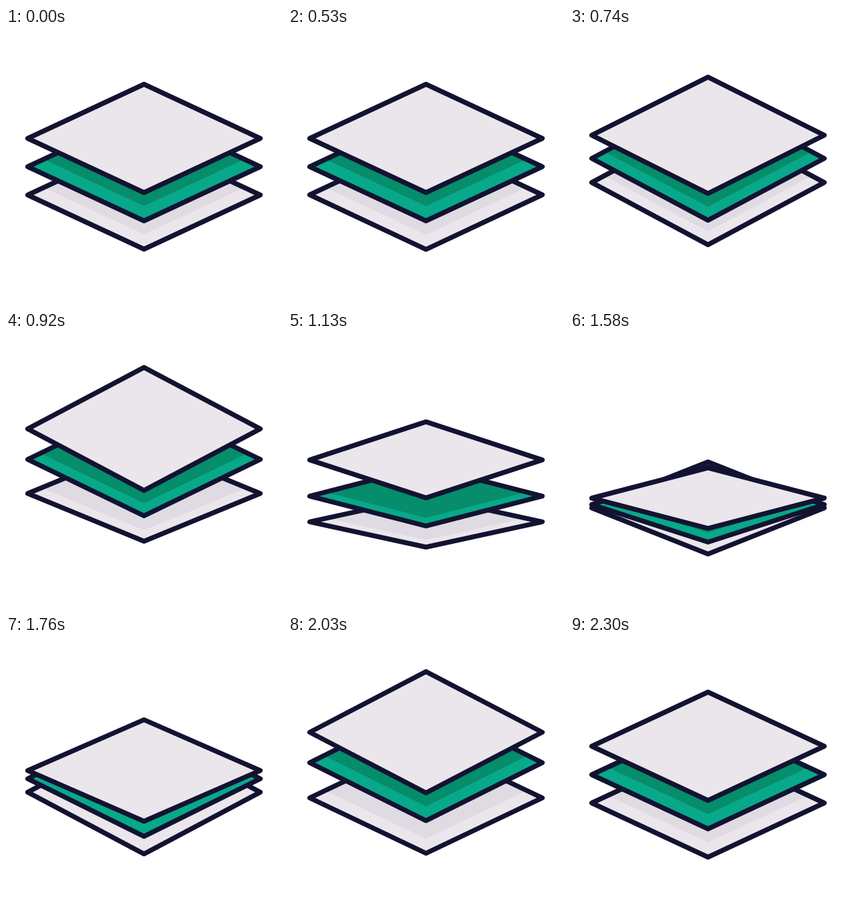
Write an HTML page that moves like this. It is 400 px wide and 400 px high and loops after 2330 ms.

```html
<!DOCTYPE html>
<html lang="en">
<head>
<meta charset="utf-8">
<title>Layers</title>
<style>
  html, body { margin: 0; width: 100%; height: 100%; overflow: hidden; background: #fff; }
  svg { display: block; width: 100%; height: 100%; }
  .edge { fill: none; stroke: #121331; stroke-width: 7; stroke-linejoin: round; }
</style>
</head>
<body>
<svg id="stage" viewBox="0 0 400 400"></svg>
<script>
const LOOP = 2330, REST = 530, STEP = 30;
const CX = 200, HALF = 168.5;

// Bottom to top: resting height, drop when squashed, delays down and up, colours
const layers = [
  { y: 242, drop: 40, lag: 0, late: 0, fill: '#eae6ec', shade: '#e0dae3' },
  { y: 201, drop: 63.5, lag: 70, late: 100, fill: '#08a88a', shade: '#068d6b' },
  { y: 160, drop: 85.5, lag: 140, late: 170, fill: '#eae6ec' }
];

const stage = document.getElementById('stage');
const add = (attr, value) => {
  const el = document.createElementNS('http://www.w3.org/2000/svg', 'polygon');
  el.setAttribute(attr, value);
  return stage.appendChild(el);
};
for (const l of layers) {
  l.body = add('fill', l.fill);
  if (l.shade) l.shadow = add('fill', l.shade);
  l.edge = add('class', 'edge');
}

const ease = u => (1 - Math.cos(Math.PI * Math.min(1, Math.max(0, u)))) / 2;

// Each move is [start, end, value]
const track = (t, from, moves) => moves.reduce(
  (v, [a, b, to]) => v + (to - v) * ease((t - a) / (b - a)), from);

const diamond = (top, side, bottom, half) =>
  `${CX},${top} ${CX + half},${side} ${CX},${bottom} ${CX - half},${side}`;

function draw(t) {
  for (const l of layers) {
    const { lag, late } = l;
    const shape = (rest, high, flat) => track(t - lag, rest, [
      [500, 700, high], [740, 1160, flat], [1320, 1800, high], [1800, 2105, rest]
    ]);
    const h = shape(78.5, 90.3, 36);
    const depth = shape(21.5, 19.5, 10.5);
    const y = l.y + track(t, 0, [
      [510 + lag, 790 + lag, -19.6],
      [795 + lag, 1225 + lag, l.drop],
      [1340 + late, 1855 + late, -20.5],
      [1855 + late, 2150 + late, 0]
    ]);
    const outline = diamond(y - h, y, y + h, HALF);
    l.body.setAttribute('points', outline);
    l.edge.setAttribute('points', outline);
    if (l.shadow) {
      const half = HALF * (1 - depth / (2 * h));
      l.shadow.setAttribute('points', diamond(y - h, y - depth / 2, y + h - depth, half));
    }
  }
}

const origin = performance.now();
function tick() {
  const t = (performance.now() - origin) % LOOP;
  draw(t < REST ? 0 : REST + Math.floor((t - REST) / STEP) * STEP);
  requestAnimationFrame(tick);
}
tick();
</script>
</body>
</html>
```
